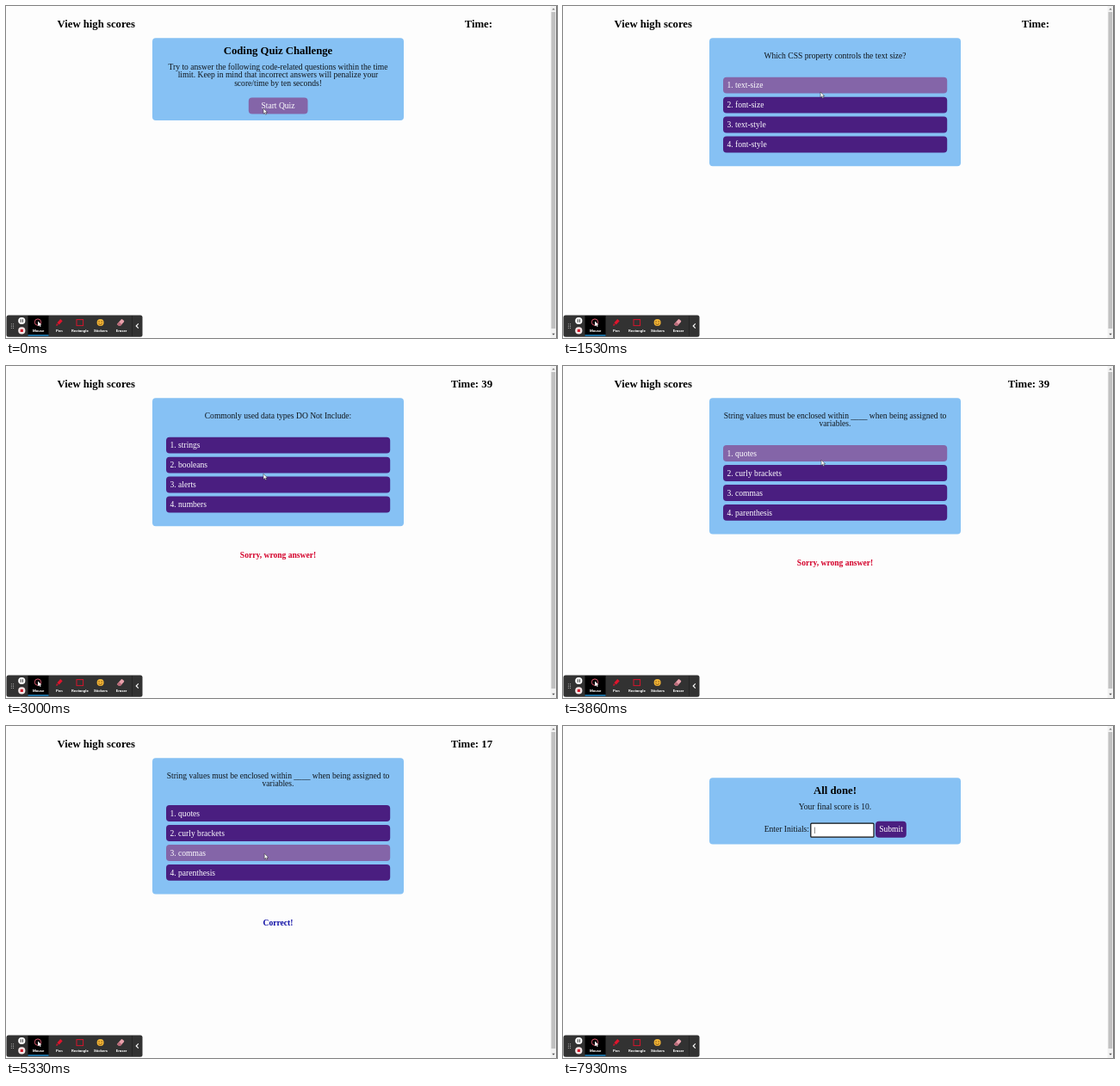
Recreate the animation shown at these times as an HTML page. Size 640 by 386 pixels, loop 8000 ms.

```html
<!DOCTYPE html>
<html lang="en">
<head>
<meta charset="utf-8">
<title>Coding Quiz</title>
<style>
  html, body { margin: 0; width: 100%; height: 100%; overflow: hidden; background: #fdfdfd; }
  svg { display: block; width: 100vw; height: 100vh; }
  text { font-family: "Liberation Serif", "Times New Roman", serif; font-size: 9.57px; fill: #10161c; white-space: pre; }
  .head { font-size: 12.72px; font-weight: bold; fill: #000; }
  .mid { text-anchor: middle; }
  .end { text-anchor: end; }
  .light { fill: #fff; }
  .note { font-weight: bold; text-anchor: middle; }
  .tool { font: bold 4.4px Roboto, "Open Sans", sans-serif; fill: #fff; text-anchor: middle; }
</style>
</head>
<body>
<svg viewBox="0 0 640 386" preserveAspectRatio="none">
  <rect width="640" height="386" fill="#fdfdfd"/>
  <g id="page"></g>

  <g id="scrollbar">
    <rect x="632.6" width="6.8" height="386" fill="#f1f1f1"/>
    <rect x="633.4" y="7" width="4.8" height="368" fill="#c1c1c1"/>
    <path d="M634.2 4.6l1.7-2 1.7 2z" fill="#777"/>
    <path d="M634.2 380.8l1.7 2 1.7-2z" fill="#505050"/>
    <rect x="639.3" width=".7" height="386" fill="#333"/>
  </g>

  <g id="toolbar">
    <rect x=".5" y="359.5" width="158" height="25.3" rx="2.5" fill="#323232"/>
    <g id="grip" fill="#bbb"></g>
    <circle cx="18.3" cy="366" r="4.1" fill="#fff"/>
    <path d="M17.2 364.2v3.6M19.4 364.2v3.6" stroke="#333" stroke-width="1"/>
    <circle cx="18.3" cy="377.4" r="4.1" fill="#f4e6e6"/>
    <rect x="16.7" y="375.8" width="3.2" height="3.2" fill="#d01c2c"/>
    <rect x="25.5" y="360" width="24" height="23.5" fill="#000"/>
    <rect x="25.5" y="382.2" width="24" height="1.5" fill="#1e88c8"/>
    <circle cx="37" cy="367.6" r="3.7" fill="none" stroke="#d8566a" stroke-width="1"/>
    <path d="M37 366.4v6l1.5-1.3 1.1 1.9 1-.6-1-1.8h1.8z" fill="#fff"/>
    <path d="M58.2 372l.7-3 1.8 1.9zM59.4 368.3l3.8-4.3 2.5 2.3-4 4.2z" fill="#e0142c"/>
    <rect x="82" y="364.6" width="7.6" height="7" fill="none" stroke="#d4142c" stroke-width="1"/>
    <circle cx="109.6" cy="368" r="4" fill="#f2b535"/>
    <path d="M107.2 367h1.7M110.4 367h1.7M107.4 369.3q2.2 2.6 4.4 0" fill="none" stroke="#6b3f10" stroke-width=".8"/>
    <path d="M129.3 369.6l4.4-5.2q.8-.7 1.6 0l1.6 1.4q.7.8 0 1.6l-4.2 4.7h-1.4l-2-1.7z" fill="#e9a0aa"/>
    <path d="M129.3 369.6l2-2.4 3.4 3-1.9 1.9h-1.4l-2-1.7z" fill="#b96a78"/>
    <path d="M146.5 360v24" stroke="#222" stroke-width=".8"/>
    <path d="M153.8 369.3l-2.6 2.7 2.6 2.7" fill="none" stroke="#fff" stroke-width="1.1"/>
    <g id="labels"></g>
  </g>

  <circle id="ring" fill="#d0103c" fill-opacity=".08" stroke="#cf1440" stroke-opacity=".85" stroke-width="1.4"/>
  <path id="arrow" d="M0 0v6.3l1.5-1.3 1 2.2 1.1-.5-1-2.1h2z" fill="#fff" stroke="#222" stroke-width=".5"/>
</svg>
<script>
const $ = id => document.getElementById(id);
const LOOP = 8000, MID = 316, LINE = 9.4;
const BLUE = '#86c1f4', PURPLE = '#4a1e80', HOVER = '#8465a8';

const css = { ask: ['Which CSS property controls the text size?'],
  options: ['text-size', 'font-size', 'text-style', 'font-style'] };
const types = { ask: ['Commonly used data types DO Not Include:'],
  options: ['strings', 'booleans', 'alerts', 'numbers'] };
const strings = { ask: ['String values must be enclosed within ____ when being assigned to', 'variables.'],
  options: ['quotes', 'curly brackets', 'commas', 'parenthesis'] };

// each list holds [start time, value]
const screens = [[0, 'intro'], [1010, css], [2700, types], [3600, strings], [5860, 'done']];
const clock = [[0, ''], [1930, ' 60'], [2930, ' 39'], [3930, ' 18'], [4930, ' 17']];
const notes = [[0, ''], [2130, 'bad'], [4200, 'good']];
const path = [
  [0, 299, 119], [150, 299, 119], [550, 314, 119], [1060, 314, 119], [1700, 296, 96], [2050, 294, 94.5],
  [2450, 294, 94.5], [2900, 299, 125.4], [3100, 299, 125.4], [3350, 300, 117], [3700, 300, 117],
  [4000, 300, 103], [4200, 300, 103], [4450, 301, 136.6], [5000, 301, 136.6],
  [5450, 300, 150.8], [7000, 300, 150.8], [7260, 292, 121]];
const clicks = [660, 2080, 3400, 4080, 5640];
const RING = 300, FOCUS = 7600, INSIDE = 7260;

const at = (list, t) => list.filter(k => k[0] <= t).pop()[1];

function cursorAt(t) {
  const i = path.findIndex(k => k[0] > t);
  if (i < 0) return path[path.length - 1].slice(1);
  const [t0, x0, y0] = path[i - 1], [t1, x1, y1] = path[i];
  const p = (t - t0) / (t1 - t0), e = p * p * (3 - 2 * p);
  return [x0 + (x1 - x0) * e, y0 + (y1 - y0) * e];
}

const text = (x, y, s, cls = '', extra = '') => `<text x="${x}" y="${y}" class="${cls}" ${extra}>${s}</text>`;
const box = (x, y, w, h, fill, r = 4) => `<rect x="${x}" y="${y}" width="${w}" height="${h}" rx="${r}" fill="${fill}"/>`;
const panel = (y, h) => box(170, y, 292, h, BLUE);

function button(x, y, w, h, cur) {
  const over = cur[0] >= x && cur[0] <= x + w && cur[1] >= y && cur[1] <= y + h;
  return box(x, y, w, h, over ? HOVER : PURPLE);
}

function intro(cur) {
  const lines = ['Try to answer the following code-related questions within the time',
    'limit. Keep in mind that incorrect answers will penalize your', 'score/time by ten seconds!'];
  return panel(37.3, 95.7) + text(MID, 55.6, 'Coding Quiz Challenge', 'head mid') +
    lines.map((s, i) => text(MID, 73.8 + i * LINE, s, 'mid')).join('') +
    button(281.8, 106.6, 68.7, 18.8, cur) + text(MID, 119.2, 'Start Quiz', 'mid light');
}

function question(q, note, cur) {
  const drop = (q.ask.length - 1) * LINE;
  let out = panel(37.3, 148.9 + drop);
  q.ask.forEach((s, i) => { out += text(MID, 60.8 + i * LINE, s, 'mid'); });
  q.options.forEach((s, i) => {
    const y = 82.7 + drop + i * 22.95;
    out += button(186, y, 260.2, 18.9, cur) + text(190.5, y + 12.6, `${i + 1}. ${s}`, 'light');
  });
  if (note) {
    const good = note === 'good';
    out += text(MID, 222.6 + drop, good ? 'Correct!' : 'Sorry, wrong answer!', 'note',
      `style="fill:${good ? '#0a0aa4' : '#d4002a'}"`);
  }
  return out;
}

function done(t) {
  const focus = t >= FOCUS;
  let out = panel(60.3, 77.3) + text(MID, 79.1, 'All done!', 'head mid') +
    text(MID, 97, 'Your final score is 10.', 'mid') + text(233.7, 123.4, 'Enter Initials:') +
    `<rect x="287.8" y="113.2" width="73.2" height="16" rx="${focus ? 1 : 0}" fill="#fff"
      stroke="${focus ? '#101010' : '#858585'}" stroke-width="${focus ? 1.2 : .8}"/>` +
    box(363, 110.7, 35.8, 19, PURPLE) + text(381, 123.4, 'Submit', 'mid light');
  if (t >= INSIDE) out += box(291.9, 117.6, .7, 7.4, '#555', 0);
  return out;
}

function draw(t) {
  const cur = cursorAt(t), screen = at(screens, t);
  let out = '';
  if (screen === 'done') out = done(t);
  else {
    out = text(59.5, 24.6, 'View high scores', 'head') + text(565, 24.6, 'Time:' + at(clock, t), 'head end');
    out += screen === 'intro' ? intro(cur) : question(screen, at(notes, t), cur);
  }
  $('page').innerHTML = out;

  const arrow = $('arrow');
  arrow.setAttribute('transform', `translate(${cur[0]} ${cur[1]})`);
  arrow.style.display = t < INSIDE ? '' : 'none';

  const hit = clicks.find(c => t >= c && t < c + RING), ring = $('ring');
  ring.style.display = hit === undefined ? 'none' : '';
  if (hit !== undefined) {
    const [x, y] = cursorAt(hit);
    ring.setAttribute('cx', x);
    ring.setAttribute('cy', y);
    ring.setAttribute('r', 5 + 9 * (t - hit) / RING);
  }
}

['Mouse', 'Pen', 'Rectangle', 'Stickers', 'Eraser'].forEach((s, i) => {
  $('labels').innerHTML += text(37.7 + i * 24.1, 378.7, s, 'tool');
});
for (let i = 0; i < 6; i++)
  $('grip').innerHTML += box(5.8 + (i % 2) * 2.2, 369.2 + (i >> 1) * 2.4, 1.1, 1.1, '#bbb', .5);

function frame() {
  draw(performance.now() % LOOP);
  requestAnimationFrame(frame);
}
frame();
</script>
</body>
</html>
```
